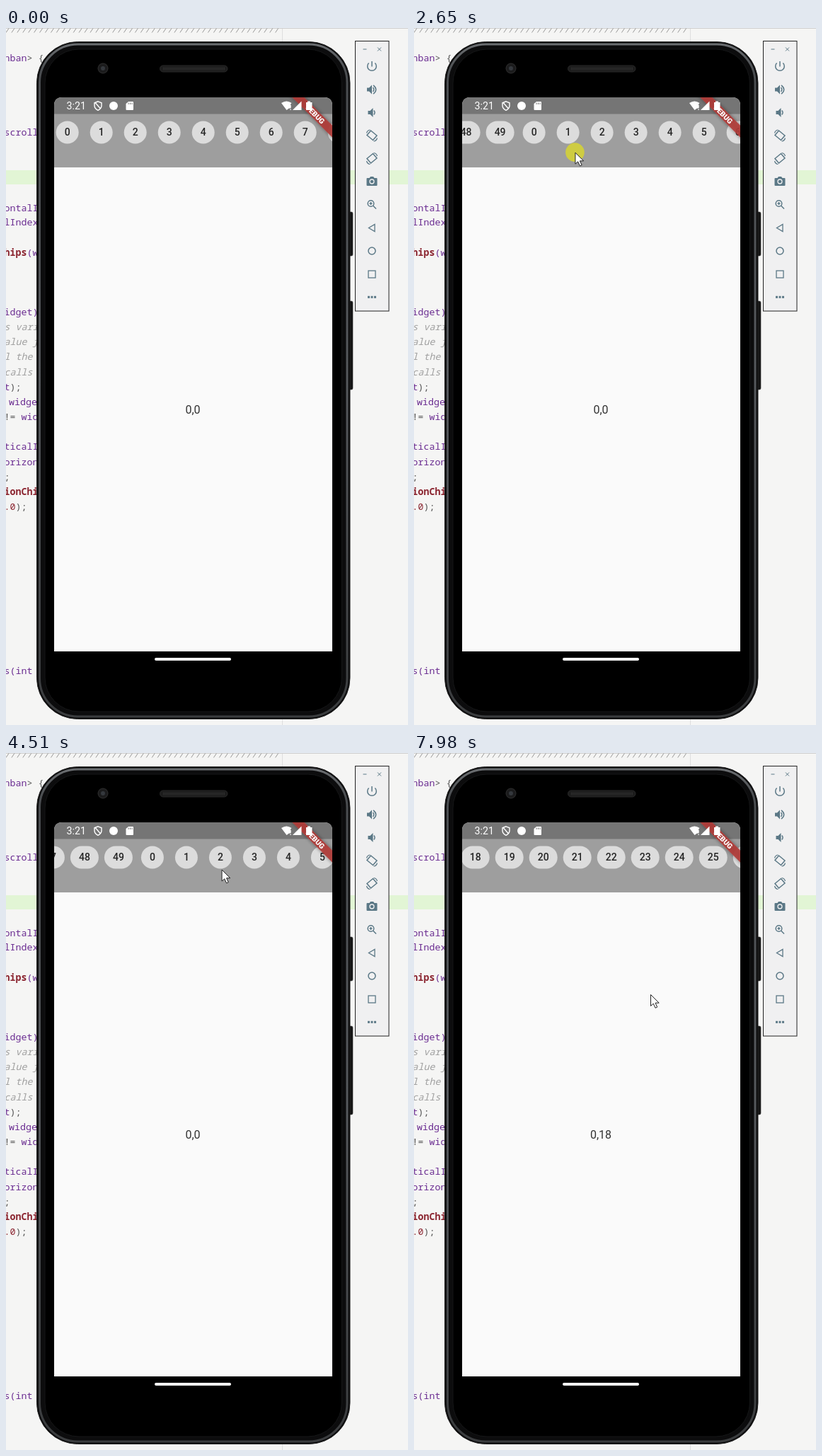
An HTML page for the animation above (8000 ms loop, 568 by 985 pixels).

```html
<!DOCTYPE html>
<html lang="en">
<head>
<meta charset="utf-8">
<title>Horizontal chip scroller</title>
<style>
  html, body { margin: 0; width: 100%; height: 100%; overflow: hidden; background: #f5f5f4; }
  svg { display: block; width: 100%; height: 100%; }
  text { white-space: pre; }
  .code { font: 13.3px "Noto Sans Mono", monospace; fill: #6a2c91; }
  .code .fn { font-weight: 700; fill: #8b2530; }
  .code .num { fill: #8b2530; }
  .code .op { fill: #555; }
  .code .note { font-style: italic; fill: #a0a0a0; }
  .ui { font-family: Roboto, sans-serif; }
  .chip { font-size: 14px; font-weight: 500; fill: #252525; text-anchor: middle; }
  .tools { fill: none; stroke: #5b7886; stroke-width: 1.5; }
  .tools .solid { fill: #5b7886; stroke: none; }
</style>
</head>
<body>
<svg viewBox="0 0 568 985">
  <defs>
    <clipPath id="screen"><path d="M68 881V110q0-12 12-12H449q12 0 12 12V881z"/></clipPath>
    <linearGradient id="metal" x2="0" y2="1">
      <stop stop-color="#6a6d70"/><stop offset=".04" stop-color="#4a4d50"/>
      <stop offset=".5" stop-color="#55585c"/><stop offset="1" stop-color="#3a3c3e"/>
    </linearGradient>
    <filter id="shade" x="-20%" y="-100%" width="140%" height="300%">
      <feDropShadow dx="0" dy="0" stdDeviation="2.6" flood-opacity=".5"/>
    </filter>
  </defs>

  <!-- editor -->
  <rect width="568" height="985" fill="#f5f5f4"/>
  <rect y="201" width="568" height="20" fill="#e2f5d5"/>
  <path d="M390.5 0V985" stroke="#dedede"/>
  <path d="M0 .5H568" stroke="#cfcfcf"/>
  <path id="slashes" stroke="#999" fill="none"/>
  <g id="code" class="code"></g>

  <!-- phone -->
  <path d="M484 260h4q2 0 2 2v58q0 2-2 2h-4zM484 386h4q2 0 2 2v121q0 2-2 2h-4z" fill="#151515" stroke="#333" stroke-width=".6"/>
  <rect x="43.5" y="19.5" width="442.5" height="957" rx="58" fill="#0c0c0d" stroke="#222"/>
  <rect x="47.5" y="23" width="434.5" height="950" rx="54" fill="none" stroke="url(#metal)" stroke-width="3"/>
  <rect x="55" y="30" width="419.5" height="936" rx="48" fill="#000" stroke="#161718"/>
  <circle cx="137" cy="57" r="7" fill="#1b1b1c" stroke="#303030"/>
  <circle cx="137" cy="57" r="3" fill="#34383d"/>
  <rect x="217.5" y="53" width="95.5" height="9" rx="4.5" fill="#1c1c1c" stroke="#292929"/>
  <path d="M222 57.5H309" stroke="#303030" stroke-width="4" stroke-dasharray="1 1"/>
  <rect x="210" y="890" width="108" height="4" rx="2" fill="#fff"/>

  <!-- app -->
  <g clip-path="url(#screen)" class="ui">
    <rect x="68" y="98" width="393" height="783" fill="#fafafa"/>
    <rect x="68" y="98" width="393" height="99" fill="#9e9e9e"/>
    <g id="chips" class="chip"></g>
    <rect x="68" y="98" width="393" height="23.5" fill="#757575"/>
    <g transform="translate(461 98) rotate(45)">
      <rect x="-60" y="28" width="120" height="12" fill="#b13a38" fill-opacity=".9" filter="url(#shade)"/>
      <text y="37.6" text-anchor="middle" font-size="10.2" font-weight="900" fill="#fff">DEBUG</text>
    </g>
    <g fill="#fff">
      <text x="85.5" y="115" font-size="14.2">3:21</text>
      <path d="M130 103.8l5 2v4q0 4-5 6.5q-5-2.5-5-6.5v-4zM126.5 106l7 8" fill="none" stroke="#fff" stroke-width="1.4"/>
      <circle cx="152" cy="110" r="6"/>
      <path d="M173 104h6q1 0 1 1v10q0 1-1 1h-8.5q-1 0-1-1v-8z"/>
      <path d="M389 106q7.5-5 14.5 0l-1.500 2v5.500h-2l-3.500 2.500z"/>
      <path d="M402 109v4M402 114.500v1.500" stroke="#fff" stroke-width="1.3"/>
      <path d="M405 116l12.500-12.500V116z"/>
      <path d="M426 103.500h4v1.500h2.500v11h-8.500v-11h2z"/>
    </g>
    <path d="M173 105.500v2.500M175.500 105.500v2.500M178 105.500v2.500" stroke="#757575"/>
    <text id="label" x="264" y="544.5" font-size="16" fill="#333" text-anchor="middle"></text>
  </g>

  <!-- emulator toolbar -->
  <rect x="493.5" y="18.5" width="47.5" height="381.5" fill="#f0f0f1" stroke="#222"/>
  <g class="tools">
    <path d="M504.500 30h5M525 27.500l5 5m0-5l-5 5" stroke-width="1"/>
    <path d="M517 47v7.500M512.600 49.500a6.300 6.300 0 1 0 8.800 0"/>
    <path class="solid" d="M510 84.500h3l4-4v13l-4-4h-3z"/>
    <path d="M518.500 84q2.500 3 0 6M519 80.800q7.500 6.200 0 12.400"/>
    <path class="solid" d="M511.500 117h3l4-4v13l-4-4h-3z"/>
    <path d="M519.800 116.500q2.500 3 0 6"/>
    <g id="rotate">
      <path d="M515.500 145l8.500 7-5.500 6.500-8.500-7z"/>
      <path d="M509.500 148.500q1-4 5-4.500M524.500 155.500q-1 4-5 4.500" stroke-width="1.2"/>
    </g>
    <use href="#rotate" transform="matrix(-1 0 0 1 1034 32.5)"/>
    <path class="solid" d="M510.500 212h3l1.500-2h4l1.500 2h3q1 0 1 1v9q0 1-1 1h-13q-1 0-1-1v-9q0-1 1-1z"/>
    <circle cx="517" cy="217" r="3" stroke="#f0f0f1" stroke-width="1.3"/>
    <circle cx="515.5" cy="248" r="4.3"/>
    <path d="M518.500 251l4.500 4.500M513.500 248h4M515.500 246v4"/>
    <path d="M521 277.500v10l-8.500-5z" stroke-width="1.3"/>
    <circle cx="517" cy="315" r="5"/>
    <rect x="512" y="343" width="10" height="10" stroke-width="1.3"/>
    <path class="solid" d="M511 378.800h3v3h-3zM515.500 378.800h3v3h-3zM520 378.800h3v3h-3z"/>
  </g>

  <!-- pointer -->
  <g id="pointer">
    <circle id="press" r="13.3" fill="#e1de1e" fill-opacity=".72"/>
    <path d="M.5 .5V16.500L4.200 13.200 7 19.300 9.700 18.100 7 12.200H12.200z" fill="#fff" stroke="#222"/>
  </g>
</svg>
<script>
const LOOP = 8000, PITCH = 48, FIRST_X = 86.7, TOTAL = 50;
const $ = id => document.getElementById(id);

// Baseline and markup of each visible code fragment
const code = [
  [47, 'nban<tspan class="op">&gt; {</tspan>'],
  [152, 'scroll'],
  [259, 'ontalI'],
  [279, 'lIndex'],
  [322, '<tspan class="fn">hips</tspan>(w'],
  [406, 'idget)'],
  [427, '<tspan class="note">s vari</tspan>'],
  [448, '<tspan class="note">alue j</tspan>'],
  [469, '<tspan class="note">l the</tspan>'],
  [491, '<tspan class="note">calls</tspan>'],
  [512, 't<tspan class="op">);</tspan>'],
  [533, 'widge', 4],
  [554, '<tspan class="op">!=</tspan> wid'],
  [596, 'ticalI'],
  [618, 'orizon'],
  [639, '<tspan class="op">;</tspan>'],
  [660, '<tspan class="fn">ionChi</tspan>'],
  [681, '<tspan class="num">.0</tspan><tspan class="op">);</tspan>'],
  [913, 's(int']
];
$('code').innerHTML = code.map(([y, s, x = -2.5]) => `<text x="${x}" y="${y}">${s}</text>`).join('');
$('slashes').setAttribute('d', Array.from({ length: 49 }, (_, i) => `M${i * 7.93} 6.500l4-6`).join(''));

// Pointer path: time, x, y
const path = [
  [560, 467, 968], [910, 228, 508], [1240, 228, 508], [1730, 136, 191],
  [1980, 136, 191], [2380, 178, 186], [2720, 240, 173], [2860, 250, 171],
  [3030, 254, 169], [3370, 236, 103], [3610, 182, 124], [3810, 168, 152],
  [4080, 205, 137], [4400, 285, 165], [4650, 329, 164], [4990, 411, 148],
  [5190, 411, 148], [5330, 401, 147], [5860, 401, 147], [6000, 404, 141],
  [6270, 405, 141], [6400, 405, 141], [6470, 410, 141], [7150, 410, 141],
  [7300, 420, 148], [7800, 420, 148], [7980, 334, 341]
];
const presses = [[1980, 3030], [5460, 5690], [6530, 6740], [7360, 7530]];

function pointerAt(t) {
  const next = path.findIndex(p => p[0] > t);
  if (next < 0) return path[path.length - 1].slice(1);
  const [t0, x0, y0] = path[Math.max(0, next - 1)], [t1, x1, y1] = path[next];
  const k = t1 > t0 ? (t - t0) / (t1 - t0) : 0;
  const e = t0 === 560 ? 1 - (1 - k) ** 2 : t0 === 1240 ? k * k * (3 - 2 * k) : k;
  return [x0 + (x1 - x0) * e, y0 + (y1 - y0) * e];
}

const selectedAt = t => t < 5660 ? 0 : t < 6670 ? 4 : t < 7500 ? 11 : 18;

// Drag follows the pointer past a small slop, then coasts to rest
function shiftAt(t, x) {
  if (t < 1980) return 0;
  if (t < 3030) return Math.max(0, x - 144.5);
  if (t < 5660) return 110.5 + 9.7 * (1 - (1 - Math.min(1, (t - 3030) / 600)) ** 3);
  return -PITCH * selectedAt(t);
}

function chip(index, shift) {
  const value = (index + TOTAL) % TOTAL;
  const x = FIRST_X + index * PITCH + shift, w = value < 10 ? 32 : 40;
  return `<rect x="${x - w / 2}" y="131.5" width="${w}" height="32" rx="16" fill="#dcdcdc"/>
    <text x="${x}" y="152.3">${value}</text>`;
}

function draw(t) {
  const [x, y] = pointerAt(t), shift = shiftAt(t, x);
  const first = Math.floor(-shift / PITCH) - 1;
  $('chips').innerHTML = Array.from({ length: 11 }, (_, i) => chip(first + i, shift)).join('');
  $('label').textContent = `0,${selectedAt(t)}`;
  $('pointer').setAttribute('transform', `translate(${x} ${y})`);
  $('pointer').setAttribute('visibility', t < 560 ? 'hidden' : 'visible');
  $('press').setAttribute('opacity', presses.some(([a, b]) => t >= a && t < b) ? 1 : 0);
}

const start = performance.now();
function tick() {
  draw((performance.now() - start) % LOOP);
  requestAnimationFrame(tick);
}
tick();
</script>
</body>
</html>
```
